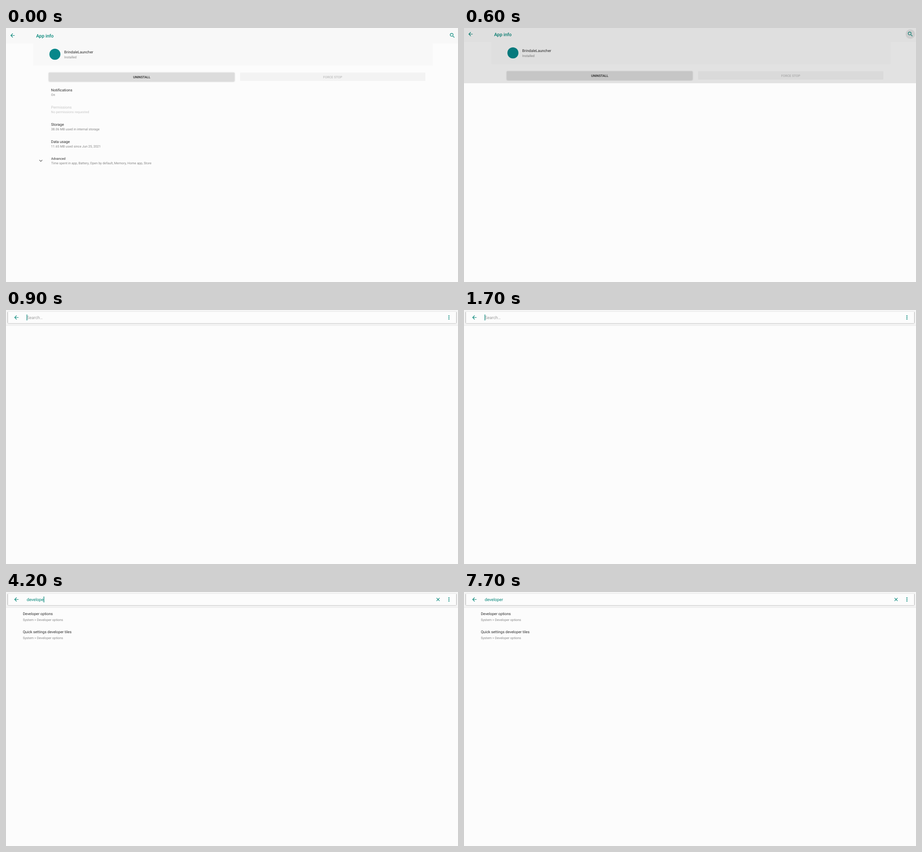
Write an HTML page that moves like this. It is 998x561 px and loops after 8000 ms.

```html
<!DOCTYPE html>
<html lang="en">
<head>
<meta charset="utf-8">
<title>Settings search</title>
<style>
  html, body { margin: 0; width: 100%; height: 100%; overflow: hidden; background: #fcfcfc; }
  svg { display: block; width: 998px; height: 561px; font-family: Roboto, sans-serif; }
  text { white-space: pre; text-rendering: geometricPrecision; }
  .heading { font-size: 10.3px; font-weight: 500; fill: #008577; }
  .query { font-size: 9.35px; fill: #008577; }
  .hint { font-size: 9.35px; fill: #9c9c9c; }
  .item { font-size: 8.25px; fill: #2b2b2b; }
  .note { font-size: 7.2px; fill: #858585; }
  .small { font-size: 7.2px; fill: #2b2b2b; }
  .off { fill: #c6c6c6; }
  .button { font-size: 7.2px; font-weight: 500; fill: #252525; text-anchor: middle; }
  .button.off { fill: #bdbdbd; }
  .icon { fill: #008577; }
</style>
</head>
<body>
<svg viewBox="0 0 998 561">
  <defs>
    <path id="back" class="icon" transform="scale(.58) translate(-12 -12)"
      d="M20 11H7.83l5.59-5.59L12 4l-8 8 8 8 1.41-1.41L7.83 13H20z"/>
    <path id="lens" class="icon" transform="scale(.58) translate(-12 -12)"
      d="M15.5 14h-.79l-.28-.27A6.47 6.47 0 0 0 16 9.5 6.5 6.5 0 1 0 9.5 16c1.61 0 3.09-.59 4.23-1.57l.27.28v.79l5 4.99L20.49 19zm-6 0a4.5 4.5 0 1 1 0-9 4.5 4.5 0 0 1 0 9z"/>
    <path id="clock" fill="none" stroke="#666" stroke-width="1"
      d="M-4 0A4.5 4.5 0 1 1-2.5 3.3M-5.8-.6L-4 1.2-2.2-.6M.5-2.5V.3L2.5 1.5"/>
    <clipPath id="window"><rect id="windowBox" width="998" height="561"/></clipPath>
    <filter id="shadow" x="-5%" y="-30%" width="110%" height="160%">
      <feDropShadow dx="0" dy=".5" stdDeviation=".8" flood-opacity=".3"/>
    </filter>
  </defs>
  <rect width="998" height="561" fill="#fcfcfc"/>

  <g id="search">
    <rect width="998" height="34" fill="#f6f6f6"/>
    <rect y="33.5" width="998" height="1" fill="#e6e6e6"/>
    <rect x="4" y="4" width="990" height="25" rx="1" fill="#fcfcfc" filter="url(#shadow)"/>
    <path d="M3.7 4.5V28.5M994.5 4.5V28.5" stroke="#b4b4b4"/>
    <use href="#back" x="0" y="0" transform="translate(23 16.5)"/>
    <g class="icon">
      <circle cx="978" cy="13" r="1.15"/><circle cx="978" cy="16.5" r="1.15"/><circle cx="978" cy="20" r="1.15"/>
    </g>
    <path id="clear" d="M950.7 13.2l6.6 6.6m0-6.6l-6.6 6.6" stroke="#008577" stroke-width="1.2"/>
    <text id="hint" class="hint" x="46" y="20.3">Search…</text>
    <text id="query" class="query" x="45.7" y="20.3"></text>
    <rect id="caret" y="10" width="1.3" height="13" fill="#008577"/>
    <g id="history"></g>
    <g id="results">
      <text class="item" x="37.2" y="50.6">Developer options</text>
      <text class="note" x="37.2" y="63.5">System &gt; Developer options</text>
      <text class="item" x="37.2" y="91">Quick settings developer tiles</text>
      <text class="note" x="37.2" y="104">System &gt; Developer options</text>
    </g>
  </g>

  <g id="app" clip-path="url(#window)">
    <rect width="998" height="561" fill="#fcfcfc"/>
    <g id="page">
      <rect y="-20" width="998" height="54" fill="#f8f8f8"/>
      <rect x="60" y="34" width="882" height="49" fill="#f8f8f8"/>
      <circle id="ripple" cx="985.5" cy="16.5" r="10.5"/>
      <use href="#back" transform="translate(14.5 16.5)"/>
      <use href="#lens" transform="translate(985.5 16.5)"/>
      <text class="heading" x="66.5" y="20.7">App info</text>
      <circle cx="108" cy="58" r="12.2" fill="#07878a"/>
      <text class="item" x="128.5" y="56.3">BrindaleLauncher</text>
      <text class="note" x="128.5" y="66.6">Installed</text>
      <rect x="94.5" y="98.5" width="410" height="19" rx="1" fill="#dcdcdc" filter="url(#shadow)"/>
      <rect x="517" y="98.5" width="409" height="18.5" rx="1" fill="#f3f3f3"/>
      <text class="button" x="299.7" y="110.7">UNINSTALL</text>
      <text class="button off" x="721.3" y="110.7">FORCE STOP</text>
      <g id="rows"></g>
      <path d="M73.7 291.5l3.2 3.2 3.2-3.2" fill="none" stroke="#666" stroke-width="1.2"/>
    </g>
    <rect id="dim" width="998" height="561"/>
  </g>
</svg>
<script>
const $ = id => document.getElementById(id);
const LOOP = 8000, STEP = 100;

const label = (cls, x, y, text) => `<text class="${cls}" x="${x}" y="${y}">${text}</text>`;

$('rows').innerHTML = [
  ['Notifications', 'On', ''],
  ['Permissions', 'No permissions requested', ' off'],
  ['Storage', '38.06 MB used in internal storage', ''],
  ['Data usage', '11.65 MB used since Jun 25, 2021', '']
].map(([title, note, state], i) =>
  label('item' + state, 99.5, 140 + i * 38, title) +
  label('note' + state, 99.5, 150.3 + i * 38, note)
).join('') +
  label('small', 99.7, 291.2, 'Advanced') +
  label('note', 99.7, 301, 'Time spent in app, Battery, Open by default, Memory, Home app, Store');

$('history').innerHTML = ['app', 'Developer', 'launch', 'Develop'].map((word, i) =>
  `<use href="#clock" transform="translate(19 ${50 + i * 33.33})"/>` +
  label('item', 37.2, 52.9 + i * 33.33, word)
).join('');

// Linear interpolation through [time, value] pairs.
function track(t, keys) {
  const next = keys.findIndex(([time]) => time > t);
  if (next === 0) return keys[0][1];
  if (next < 0) return keys[keys.length - 1][1];
  const [t0, a] = keys[next - 1], [t1, b] = keys[next];
  return a + (b - a) * (t - t0) / (t1 - t0);
}

const TYPING = [[2700, 2], [3000, 3], [3300, 4], [3600, 5], [3900, 6], [4000, 7], [4200, 8], [4400, 9]];
const CARET_TOGGLES = [800, 1200, 1700, 2100, 2600, 4800, 5200, 5800, 6200, 6700, 7200, 7700];

function draw(t) {
  $('app').style.display = t < 900 ? '' : 'none';
  $('windowBox').setAttribute('height', track(t, [[500, 561], [600, 122], [700, 25], [800, 5]]));
  $('page').setAttribute('transform', `translate(0 ${track(t, [[500, 0], [600, -3], [700, -9.2], [800, -12]])})`);
  $('dim').setAttribute('opacity', track(t, [[500, 0], [600, .1]]));
  $('ripple').setAttribute('opacity', t < 500 ? 0 : track(t, [[500, .08], [600, .08], [700, .02]]));

  $('search').setAttribute('opacity', track(t, [[500, 0], [600, .05], [700, .3], [800, .7], [900, .95], [1000, 1]]));
  const typed = TYPING.reduce((count, [time, length]) => t >= time ? length : count, 0);
  $('query').textContent = 'developer'.slice(0, typed);
  $('hint').style.display = typed ? 'none' : '';
  $('clear').style.display = typed ? '' : 'none';
  const caretOn = CARET_TOGGLES.filter(time => time <= t).length % 2;
  $('caret').setAttribute('x', 45.6 + (typed ? $('query').getComputedTextLength() : 0));
  $('caret').style.display = caretOn ? '' : 'none';

  $('history').setAttribute('opacity',
    track(t, [[3200, 0], [3300, .05], [3400, .17], [3500, .55], [3600, 1], [3800, 1], [3900, .6], [4000, .2], [4100, 0]]));
  $('results').setAttribute('opacity', track(t, [[3900, 0], [4000, .2], [4100, .6], [4200, 1]]));
}

const start = performance.now();
function tick() {
  const t = (performance.now() - start) % LOOP;
  draw(Math.floor(t / STEP) * STEP);
  requestAnimationFrame(tick);
}
tick();
</script>
</body>
</html>
```
